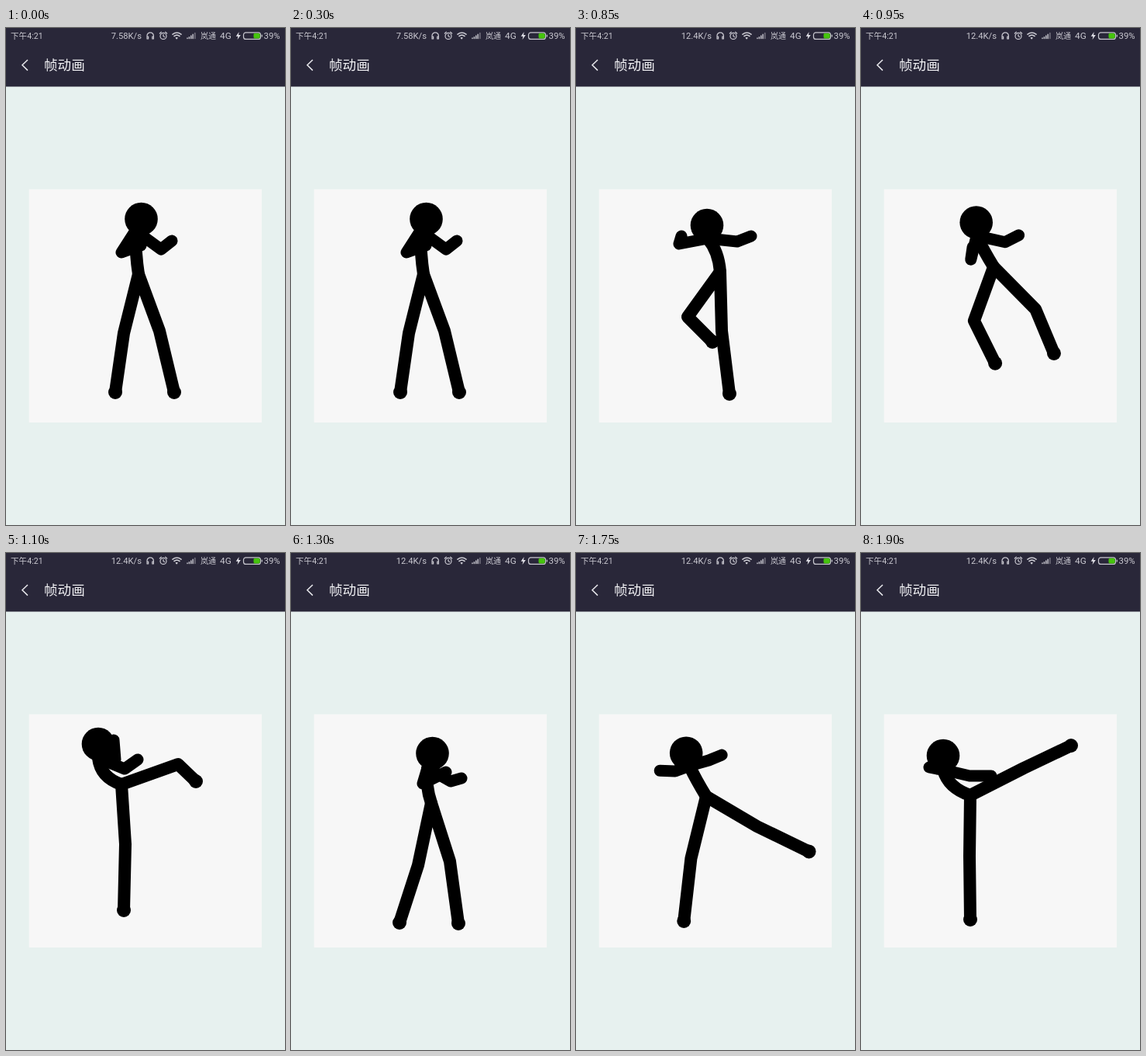
Write an HTML page that moves like this. It is 360 by 640 pixels and loops after 1.95 s.

```html
<!DOCTYPE html>
<html lang="zh">
<head>
<meta charset="utf-8">
<title>帧动画</title>
<style>
  html, body { margin: 0; width: 100%; height: 100%; overflow: hidden; background: #e7f1ef; }
  svg { display: block; width: 100vw; height: 100vh; }
  text { font-family: Roboto, 'Noto Sans CJK SC', 'Noto Sans CJK', sans-serif; fill: #c9c8d0; }
  .icon { fill: none; stroke: #c9c8d0; stroke-width: 1.2; stroke-linecap: round; stroke-linejoin: round; }
  #figure { filter: blur(.5px); }
  #figure path { fill: none; stroke: #000; stroke-width: 16; stroke-linecap: round; stroke-linejoin: round; }
  #figure #arms { stroke-width: 15; }
</style>
</head>
<body>
<svg viewBox="0 0 360 640">
  <rect width="360" height="640" fill="#e7f1ef"/>
  <rect width="360" height="75.500" fill="#292739"/>
  <text x="6" y="14" font-size="10.6">下午4:21</text>
  <text id="speed" x="175" y="14" font-size="11.2" text-anchor="end"></text>
  <g class="icon">
    <path d="M182 12V10a4.2 4.2 0 0 1 8.4 0V12M182 11v3h1.6v-3zM190.4 11v3h-1.6v-3z"/>
    <circle cx="203" cy="10.4" r="4"/>
    <path d="M203 8.3v2.3l1.6 1M198.3 7l2-1.8M207.7 7l-2-1.8"/>
    <path d="M215 8.2q5.5-4.4 11 0M217 10.5q3.5-2.7 7 0" stroke-width="1.6"/>
    <path d="M219.3 12.6h1.8l-.9 1.2z" fill="#c9c8d0"/>
    <path d="M234 13.5v-.5M236.4 13.5v-1.8M238.8 13.5v-3.5M241.2 13.5v-5.2" stroke-width="1.5"/>
    <path d="M243.8 13.5v-7" stroke-width="1.5" opacity=".5"/>
    <rect x="306.5" y="5.8" width="22" height="8.6" rx="3"/>
    <path d="M330.3 9v2"/>
  </g>
  <rect x="319.5" y="6.8" width="8.2" height="6.6" rx="1.6" fill="#45c40d"/>
  <path d="M300.7 5l-4 5.7h2.700l-.8 4.300 4.200-6h-2.800z" fill="#e2e1e8"/>
  <text x="251" y="14" font-size="10">岚通</text>
  <text x="276" y="14" font-size="11.8">4G</text>
  <text x="332.5" y="14" font-size="11.4">39%</text>
  <path d="M28 41l-7 6.8 7 6.8" fill="none" stroke="#e8e8ec" stroke-width="1.5"/>
  <text x="49" y="54" font-size="17.6" style="fill:#f2f2f5">帧动画</text>
  <rect x="29.7" y="207.7" width="300.300" height="300.300" fill="#f7f7f7"/>
  <g id="figure">
    <path id="spine"/>
    <path id="legs"/>
    <path id="arms"/>
    <circle id="head" r="21.3"/>
    <circle id="footA" r="9"/>
    <circle id="footB" r="9"/>
  </g>
</svg>
<script>
const LOOP = 1950, STEP = 50;
const $ = id => document.getElementById(id);

// Each joint hangs from a parent, so limbs swing in arcs around it.
const PARENT = {
  head: 'hip', neck: 'hip', mid: 'hip',
  kneeA: 'hip', footA: 'kneeA', kneeB: 'hip', footB: 'kneeB',
  elbowA: 'neck', handA: 'elbowA', elbowB: 'neck', handB: 'elbowB'
};

const stance = {
  hip: [171, 317], head: [174.5, 246], neck: [167, 261], mid: [168, 290],
  kneeA: [152, 393], footA: [141, 469], kneeB: [198, 390], footB: [217, 469],
  elbowA: [149, 289], handA: [174, 280], elbowB: [200, 285], handB: [214, 274]
};
const kneeUp = {
  hip: [186, 314], head: [169, 254], neck: [170, 271], mid: [181, 290],
  kneeA: [144, 372], footA: [176, 404], kneeB: [188, 390], footB: [198, 471],
  elbowA: [133, 278], handA: [136, 268], elbowB: [208, 275], handB: [226, 268]
};
const lowKick = {
  hip: [149, 298], head: [119, 246], neck: [119, 264], mid: [128, 285],
  kneeA: [154, 375], footA: [152, 460], kneeB: [222, 272], footB: [245, 294],
  elbowA: [141, 266], handA: [139, 241], elbowB: [153, 278], handB: [170, 266]
};
const landing = {
  hip: [181, 322], head: [182.5, 258], neck: [176, 277], mid: [176, 300],
  kneeA: [164, 402], footA: [140, 476], kneeB: [205, 397], footB: [216, 477],
  elbowA: [170, 297], handA: [200, 282], elbowB: [206, 294], handB: [220, 290]
};
const windUp = {
  hip: [195, 315], head: [179, 256], neck: [187, 274], mid: [195, 293],
  kneeA: [156, 392], footA: [137, 470], kneeB: [198, 390], footB: [216, 469],
  elbowA: [166, 297], handA: [137, 301], elbowB: [199, 262], handB: [205, 256]
};
const highKick = {
  hip: [141, 312], head: [106, 261], neck: [106, 279], mid: [118, 299],
  kneeA: [140, 390], footA: [141, 472], kneeB: [210, 277], footB: [271, 248],
  elbowA: [98, 278], handA: [88, 276], elbowB: [140, 287], handB: [168, 287]
};

const KEYS = [
  [0, stance], [600, stance], [850, kneeUp], [1100, lowKick], [1300, landing],
  [1450, stance], [1550, stance], [1600, windUp], [1900, highKick], [LOOP, highKick]
];

const mix = (a, b, k) => a + (b - a) * k;

function bone(pose, joint) {
  const [x, y] = pose[joint], [px, py] = pose[PARENT[joint]];
  return { angle: Math.atan2(y - py, x - px), length: Math.hypot(x - px, y - py) };
}

function blend(from, to, k) {
  const pose = { hip: from.hip.map((v, i) => mix(v, to.hip[i], k)) };
  for (const joint in PARENT) {
    const a = bone(from, joint), b = bone(to, joint);
    const turn = Math.atan2(Math.sin(b.angle - a.angle), Math.cos(b.angle - a.angle));
    const angle = a.angle + turn * k, length = mix(a.length, b.length, k);
    const [x, y] = pose[PARENT[joint]];
    pose[joint] = [x + length * Math.cos(angle), y + length * Math.sin(angle)];
  }
  return pose;
}

function poseAt(t) {
  const i = KEYS.findIndex(([end]) => t < end);
  const [start, from] = KEYS[i - 1], [end, to] = KEYS[i];
  return blend(from, to, (t - start) / (end - start));
}

const line = (...points) => 'M' + points.join('L');

function place(id, [x, y]) {
  $(id).setAttribute('cx', x);
  $(id).setAttribute('cy', y);
}

function draw(t) {
  const p = poseAt(t);
  const bend = p.mid.map((v, i) => 2 * v - (p.neck[i] + p.hip[i]) / 2);
  $('spine').setAttribute('d', `M${p.neck}Q${bend} ${p.hip}`);
  $('legs').setAttribute('d', line(p.footA, p.kneeA, p.hip, p.kneeB, p.footB));
  $('arms').setAttribute('d', line(p.handA, p.elbowA, p.neck, p.elbowB, p.handB));
  for (const id of ['head', 'footA', 'footB']) place(id, p[id]);
  $('speed').textContent = t < 700 ? '7.58K/s' : '12.4K/s';
}

const begin = performance.now();
function tick() {
  const t = (performance.now() - begin) % LOOP;
  draw(Math.floor(t / STEP) * STEP);
  requestAnimationFrame(tick);
}
tick();
</script>
</body>
</html>
```
